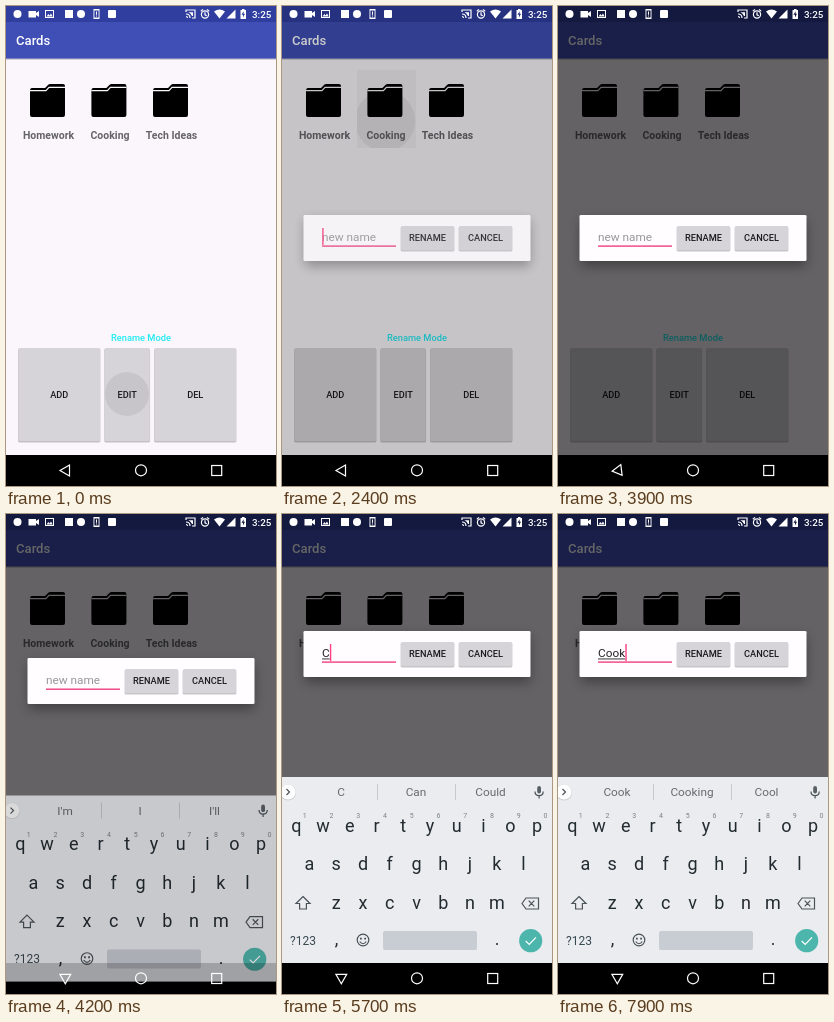
Animation of 270x480 px, one loop 8 s. Source, as an HTML page:

```html
<!DOCTYPE html>
<html lang="en">
<head>
<meta charset="utf-8">
<title>Rename a folder</title>
<style>
html, body { margin: 0; width: 100%; height: 100%; overflow: hidden; background: #000; }
svg { display: block; width: 100vw; height: 100vh; font-family: Roboto, sans-serif; }
text { white-space: pre; }
.mid { text-anchor: middle; }
.label { font-size: 10.5px; font-weight: 700; fill: #666468; }
.button { font-size: 9.2px; font-weight: 500; fill: #1b1a1c; }
.key { font-size: 18px; fill: #222b30; }
.hint { font-size: 7px; fill: #7b8288; }
.word { font-size: 11.8px; fill: #666b70; }
.line { fill: none; stroke: #4a5358; stroke-width: 1.2; }
.white { fill: none; stroke: #fff; stroke-width: 1.2; }
</style>
</head>
<body>
<svg viewBox="0 0 270 480">
  <defs>
    <filter id="soft" x="-20%" y="-60%" width="140%" height="240%"><feGaussianBlur stdDeviation="6"/></filter>
    <clipPath id="cellClip"><rect x="75" y="64" width="59" height="78"/></clipPath>
    <clipPath id="editClip"><rect x="99" y="342" width="45" height="93"/></clipPath>
    <g id="folder">
      <path d="M0 7Q0 4 2 4H15L18 1Q19 0 20 0H33Q35 0 35 2V31Q35 33 33 33H2Q0 33 0 31Z"/>
      <path d="M0 6.6H16L19 3.4H35" fill="none" stroke="#faf6fb" stroke-width="1.2"/>
    </g>
  </defs>

  <rect width="270" height="480" fill="#faf6fb"/>
  <rect y="16" width="270" height="38" fill="#000" opacity=".15"/>
  <rect y="16" width="270" height="36.6" fill="#3f4fb5"/>
  <rect width="270" height="16" fill="#303f9f"/>
  <text x="10" y="39" font-size="13.1" font-weight="500" fill="#fff">Cards</text>

  <g clip-path="url(#cellClip)">
    <rect id="cell" x="75" y="64" width="59" height="78" fill="#000"/>
    <circle id="cellRipple" cx="103" cy="115" fill="#000"/>
  </g>
  <g id="folders"></g>
  <text class="mid" x="135" y="335" font-size="9.3" font-weight="500" fill="#22ebf2">Rename Mode</text>
  <g id="actions"></g>
  <circle id="editRipple" cx="121" cy="388" r="22" fill="#000" clip-path="url(#editClip)"/>

  <rect id="dim" width="270" height="449" fill="#000"/>

  <g id="dialog">
    <rect x="23" y="214" width="225" height="46" filter="url(#soft)" opacity=".35"/>
    <rect x="21.5" y="209" width="227" height="46" rx="1.3" fill="#fffdff"/>
    <rect x="40" y="239.4" width="74" height="1.4" fill="#f0407f"/>
    <text id="hint" x="40" y="235" font-size="11.8" fill="#98969a">new name</text>
    <text id="typed" x="40" y="235" font-size="11.8" fill="#222"></text>
    <rect id="composing" x="40" y="236.5" height=".9" fill="#222"/>
    <rect id="cursor" y="222" width="1.4" height="17" fill="#ff4081"/>
    <g id="dialogButtons"></g>
  </g>

  <rect y="449" width="270" height="31"/>
  <g id="keyboard">
    <rect y="263" width="270" height="186" fill="#eaecf0"/>
    <circle cx="6" cy="278.5" r="8" fill="#000" opacity=".12"/>
    <circle cx="6" cy="278" r="7.6" fill="#fff"/>
    <path class="line" d="M4.5 275L7.5 278L4.5 281"/>
    <path d="M95.5 270V286M173.5 270V286" stroke="#c6cacf"/>
    <g id="words"></g>
    <rect x="255.2" y="272" width="3.8" height="7.5" rx="1.9" fill="#596167"/>
    <path class="line" d="M253 277.5Q253 281.6 257.1 281.6T261.2 277.5M257.1 281.6V284.5"/>
    <g id="keys"></g>
    <path id="shift" class="line" d="M21 382.5L28 389.5H24.4V395H17.6V389.5H14Z"/>
    <path class="line" d="M240 389.5L244 384H256.5V395H244ZM246.7 386.7L252.3 392.3M252.3 386.7L246.7 392.3"/>
    <text x="8" y="430.7" font-size="12" fill="#37474f">?123</text>
    <text class="key mid" x="54.5" y="431">,</text>
    <text class="key mid" x="215" y="431">.</text>
    <circle class="line" cx="81" cy="426" r="5.8"/>
    <path class="line" d="M77.7 427.5Q81 432 84.3 427.5"/>
    <path d="M78 423.8h1.8v1.8h-1.8zM82.2 423.8h1.8v1.8h-1.8z" fill="#4a5358"/>
    <rect x="101" y="417" width="94" height="19" rx="2" fill="#c8ccd3"/>
    <circle cx="248.7" cy="426.7" r="11.6" fill="#4db6ac"/>
    <path class="white" d="M243.7 427L247.2 430.4L254 423.3" stroke-width="1.5"/>
    <g id="popup">
      <rect x="-16" y="-62" width="32" height="44" rx="3" fill="#000" opacity=".18"/>
      <rect x="-16" y="-63" width="32" height="44" rx="3" fill="#fafbfc"/>
      <text id="popupKey" class="key mid" y="-35"></text>
    </g>
    <rect id="keyboardShade" y="263" width="270" height="186" fill="#0a0008"/>
  </g>

  <rect id="navShade" y="449" width="270" height="31"/>
  <path id="back" class="white" d="M54 464.5L63.5 459.1V469.9Z"/>
  <circle class="white" cx="135" cy="464.3" r="5.5"/>
  <rect class="white" x="205.7" y="459.5" width="10" height="10"/>

  <g fill="#fff">
    <circle cx="11.5" cy="8" r="4"/>
    <path d="M22.5 5H30V7L33 5V11L30 9V11.5H22.5Z"/>
    <path fill-rule="evenodd" d="M39 4H48V12H39ZM40 5V11H47V5ZM40.5 10.5L42.3 8L43.6 9.4L45 7.4L46.7 10.5Z"/>
    <rect x="59" y="4" width="8" height="8"/>
    <circle cx="75" cy="8" r="4"/>
    <path fill-rule="evenodd" d="M87.5 3H93.5V13H87.5ZM88.4 4.5V11.5H92.6V4.5ZM90 5.5H91V8.7H90ZM90 9.5H91V10.5H90Z"/>
    <rect x="102" y="4" width="8" height="8" rx="1"/>
    <path d="M208 5.5Q213.5 1.5 219 5.5L213.5 12.5Z"/>
    <path d="M229.5 3.5V12.5H220.5Z"/>
    <path fill-rule="evenodd" d="M234.5 4H236V3H238.5V4H240V13H234.5ZM237.6 5.2L235.5 8.8H237V11.5L239 7.8H237.6Z"/>
    <text x="246" y="11.7" font-size="9.8" font-weight="500">3:25</text>
  </g>
  <g class="white">
    <path d="M180 6V4H189V12H186M180 8Q184 8 184 12M180 10.5Q181.5 10.5 181.5 12"/>
    <path d="M182.5 6.3H187V10H186Q185 7.5 182.5 6.3Z" fill="#fff" stroke="none"/>
    <circle cx="199" cy="8.5" r="3.6"/>
    <path d="M199 6.3V8.8L200.8 9.8M194.8 5.2L197 3.4M203.2 5.2L201 3.4"/>
  </g>
</svg>

<script>
const $ = id => document.getElementById(id);
const set = (id, attrs) => { for (const k in attrs) $(id).setAttribute(k, attrs[k]); };
const clamp = x => Math.max(0, Math.min(1, x));
const ramp = (t, from, to) => clamp((t - from) / (to - from));
const show = (id, visible) => set(id, { opacity: visible ? 1 : 0 });

const label = (cls, x, y, text) => `<text class="${cls} mid" x="${x}" y="${y}">${text}</text>`;
const button = (x, y, w, h, text) =>
  `<rect x="${x - .4}" y="${y + 1}" width="${w + .8}" height="${h + .4}" rx="1.3" opacity=".22"/>
   <rect x="${x}" y="${y}" width="${w}" height="${h}" rx="1.3" fill="#d6d4d8"/>` +
  label('button', x + w / 2, y + h / 2 + 3.2, text);

$('folders').innerHTML = [['Homework', 24, 42.5], ['Cooking', 85.4, 104], ['Tech Ideas', 147, 165.5]]
  .map(([name, x, mid]) => `<use href="#folder" x="${x}" y="78"/>` + label('label', mid, 133, name)).join('');
$('actions').innerHTML = button(12.5, 342, 81.5, 93, 'ADD') + button(98.7, 342, 45, 93, 'EDIT') +
  button(148.5, 342, 81.5, 93, 'DEL');
$('dialogButtons').innerHTML = button(119, 220, 53, 24, 'RENAME') + button(177, 220, 53, 24, 'CANCEL');
$('words').innerHTML = [59, 134, 208.5].map(x => label('word', x, 282.3, '')).join('');

const keyAt = {};
let keyMarkup = '';
[['qwertyuiop', 14.3], ['asdfghjkl', 27.5], ['zxcvbnm', 54.3]].forEach(([row, left], r) => {
  [...row].forEach((k, i) => {
    const x = left + i * 26.75, y = 317.5 + r * 38.6;
    keyAt[k] = [x, y];
    keyMarkup += label('key letter', x, y, k);
    if (!r) keyMarkup += label('hint', x + 8.5, 304, (i + 1) % 10);
  });
});
$('keys').innerHTML = keyMarkup;
const letters = [...document.querySelectorAll('.letter')];
const words = [...$('words').children];

// Each stroke commits its text when the key is released.
const strokes = [
  { key: 'c', down: 5500, up: 5600, text: 'C', words: ['C', 'Can', 'Could'] },
  { key: 'o', down: 5900, up: 6100, text: 'Co', words: ['Co', 'Come', 'Could'] },
  { key: 'o', down: 6400, up: 6700, text: 'Coo', words: ['Coo', 'Cool', 'Cook'] },
  { key: 'k', down: 7200, up: 7500, text: 'Cook', words: ['Cook', 'Cooking', 'Cool'] }
];
const idle = { up: 2400, text: '', words: ["I'm", 'I', "I'll"] };

function render(t) {
  set('editRipple', { opacity: .07 * (1 - ramp(t, 0, 500)) });
  set('cell', { opacity: .035 * ramp(t, 2050, 2200) * (1 - ramp(t, 2600, 2900)) });
  set('cellRipple', {
    r: Math.max(0, Math.min(60, 10 + (t - 2300) * .2)),
    opacity: t < 2150 ? 0 : .06 * (1 - ramp(t, 2400, 2700))
  });
  set('dim', { opacity: .6 * ramp(t, 2315, 2570) });

  const rise = 1 - (1 - ramp(t, 4100, 4500)) ** 4.2;
  set('dialog', { opacity: ramp(t, 2330, 2415), transform: `translate(0 ${-92 * rise})` });
  set('keyboard', { opacity: rise > 0 ? 1 : 0, transform: `translate(0 ${63 * (1 - rise)})` });
  set('keyboardShade', { opacity: .5 * (1 - rise) });
  set('navShade', { opacity: rise > 0 && rise < 1 ? .2 : 1 });
  set('back', { transform: `rotate(${-90 * ramp(t, 3880, 4150)} 59.3 464.5)` });

  const last = strokes.filter(s => t >= s.up).pop() || idle;
  $('typed').textContent = last.text;
  show('hint', !last.text);
  const width = last.text ? $('typed').getComputedTextLength() : 0;
  set('composing', { width });
  set('cursor', { x: 40.2 + width });
  const blinkStart = last === idle && t >= 3100 ? 3400 : last.up;
  const blinkOn = last === idle && t < 3400 ? t < 3100 : (t - blinkStart) % 1000 < 500;
  show('cursor', blinkOn);

  const shifted = t >= 4850 && t < 5600;
  letters.forEach(el => {
    const k = el.textContent;
    el.textContent = shifted ? k.toUpperCase() : k.toLowerCase();
  });
  set('shift', { style: shifted ? 'fill:#4a5358' : '' });
  words.forEach((el, i) => el.textContent = last.words[i]);

  const pressed = strokes.find(s => t >= s.down && t < s.up);
  show('popup', pressed);
  if (pressed) {
    set('popup', { transform: `translate(${keyAt[pressed.key]})` });
    $('popupKey').textContent = shifted ? pressed.key.toUpperCase() : pressed.key;
  }
}

const start = performance.now();
function tick() {
  render((performance.now() - start) % 8000);
  requestAnimationFrame(tick);
}
tick();
</script>
</body>
</html>
```
